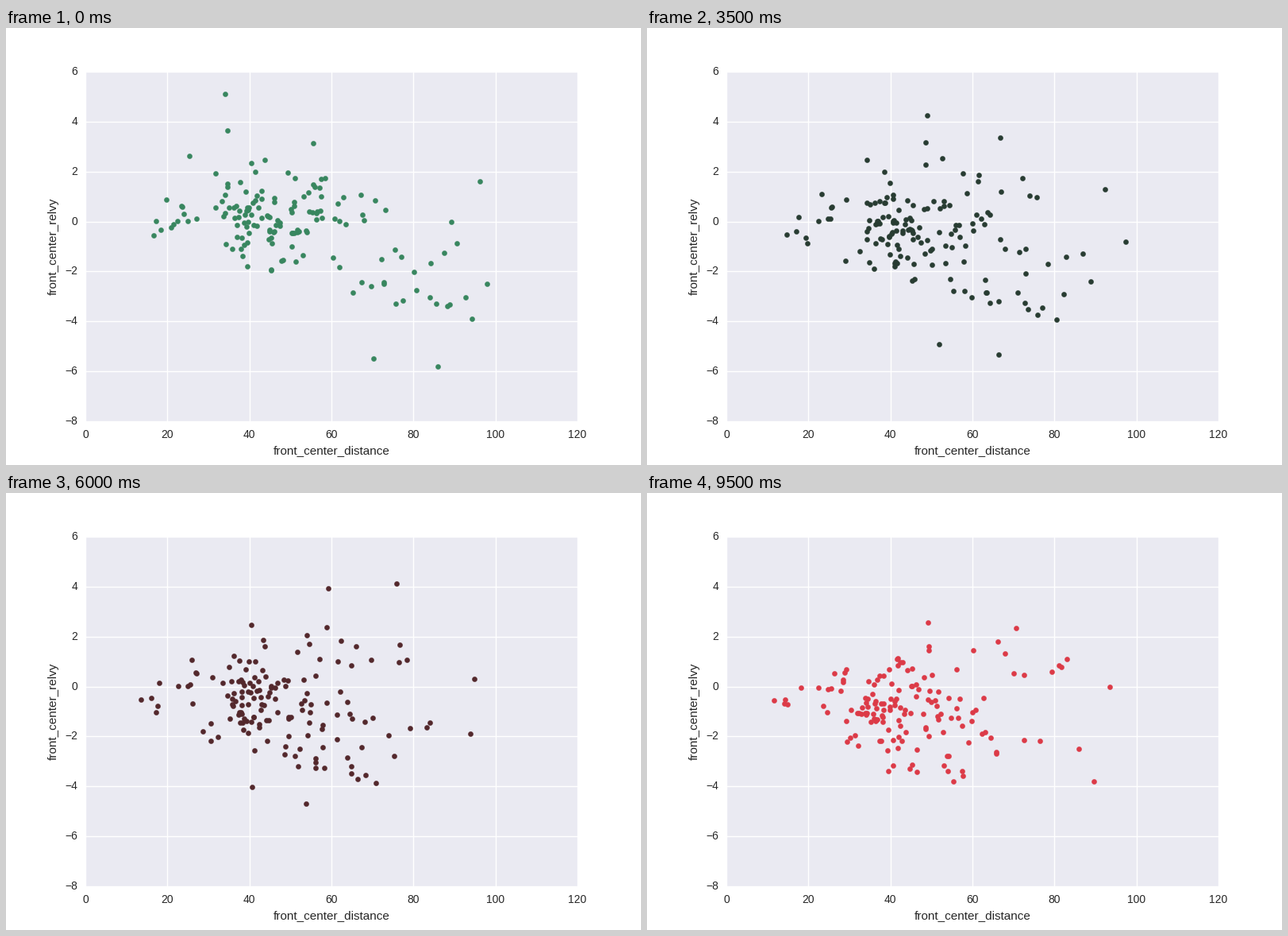
These frames come from a looping animation (800 px wide and 550 px high, 10 s). A matplotlib script:

```python
import numpy as np
import matplotlib.pyplot as plt
from matplotlib.animation import FuncAnimation

FRAMES, STEP_MS = 20, 500
INK = "#262626"
GREEN, DARK, RED = (np.array(c) / 255 for c in
                    ((56, 134, 95), (34, 34, 34), (220, 58, 71)))

plt.rcParams["font.family"] = "Liberation Sans"
rng = np.random.default_rng(12)


def stream(count, near, far, speeds, spread):
    """Cars as rows of start distance and speed at 0 s, 4.5 s and 9.5 s."""
    x0 = np.linspace(near, far, count) + rng.normal(0, 0.8, count)
    pace = spread * rng.normal(size=(count, 1))
    wobble = 0.25 * rng.normal(size=(count, 3))
    return np.column_stack([x0, np.array(speeds) + pace + wobble])


EXTREMES = [
    (34.0, 5.1, 2.6, -0.5), (34.7, 3.65, 4.2, 2.35), (55.6, 3.15, 3.6, 6.1),
    (96.2, 1.6, -1.3, -2.5), (97.9, -2.5, -2.1, 1.1), (89.2, 0.0, 1.1, -3.8),
    (86.0, -5.8, -5.1, -3.4), (70.3, -5.5, -4.6, -2.2),
]
cars = np.vstack([
    EXTREMES,
    stream(15, 62, 95, (-3.0, -3.2, -3.0), 0.55),   # closing in
    stream(7, 72, 90, (-1.3, -1.6, -2.3), 0.3),     # slowly closing
    stream(7, 25, 55, (2.1, 2.1, 1.5), 0.3),        # pulling away
    stream(4, 64, 74, (0.6, 0.9, 0.6), 0.5),        # holding distance
    stream(11, 17, 25, (0.3, 0.1, 0.0), 0.35),      # close ahead
])

# The dense crowd: each car sways about its own centre while drifting back.
CROWD = 102
centre = np.minimum(29.5 + rng.gamma(2.5, 6.8, CROWD), rng.uniform(58, 69, CROWD))
sway = np.minimum(rng.rayleigh(0.95, CROWD), 2.0)
rate = rng.uniform(0.3, 0.6, CROWD)
phase = rng.uniform(0, 2 * np.pi, CROWD)


def outliers(t):
    x0, v0, v_mid, v_end = cars.T
    slope = (v_mid - v0) / 4.5
    bend = ((v_end - v_mid) / 5 - slope) / 9.5
    v = v0 + slope * t + bend * t * (t - 4.5)
    x = x0 + v0 * t + slope * t**2 / 2 + bend * (t**3 / 3 - 2.25 * t**2)
    return x, np.where(v > 6, 0, v)  # a lost car reads as zero speed


def crowd(t):
    angle = rate * t + phase
    x = (centre + 0.05 * t - 0.065 * t**2 + 0.004 * t**3 / 3
         - sway / rate * np.cos(angle))
    v = 0.05 - 0.13 * t + 0.004 * t**2 + sway * np.sin(angle)
    return x, v


def colour(i):
    k = 2 * i / (FRAMES - 1) - 1
    return DARK + abs(k) * ((GREEN if k < 0 else RED) - DARK)


fig = plt.figure(figsize=(8, 5.5), dpi=100, facecolor="white")
ax = fig.add_axes([0.125, 0.1, 0.775, 0.8], facecolor="#EAEAF2")
ax.set(xlim=(0, 120), ylim=(-8, 6),
       xticks=range(0, 121, 20), yticks=range(-8, 7, 2))
ax.set_axisbelow(True)
ax.grid(color="white", linewidth=1)
ax.tick_params(length=0, labelsize=10, labelcolor=INK, pad=7)
plt.setp(ax.get_yticklabels(), va="center")
ax.spines[:].set_visible(False)

label = dict(size=11, color=INK, ha="center", va="baseline",
             rotation_mode="anchor")
fig.text(410 / 800, 1 - 536 / 550, "front_center_distance", **label)
fig.text(64 / 800, 0.5, "front_center_relvy", rotation=90, **label)

dots = ax.scatter([], [], s=20, linewidths=0.3)


def draw(i):
    t = i * STEP_MS / 1000
    dots.set_offsets(np.hstack([outliers(t), crowd(t)]).T)
    dots.set_color([colour(i)])
    return dots,


anim = FuncAnimation(fig, draw, frames=FRAMES, interval=STEP_MS,
                     repeat=True, repeat_delay=0)
plt.show()
```
